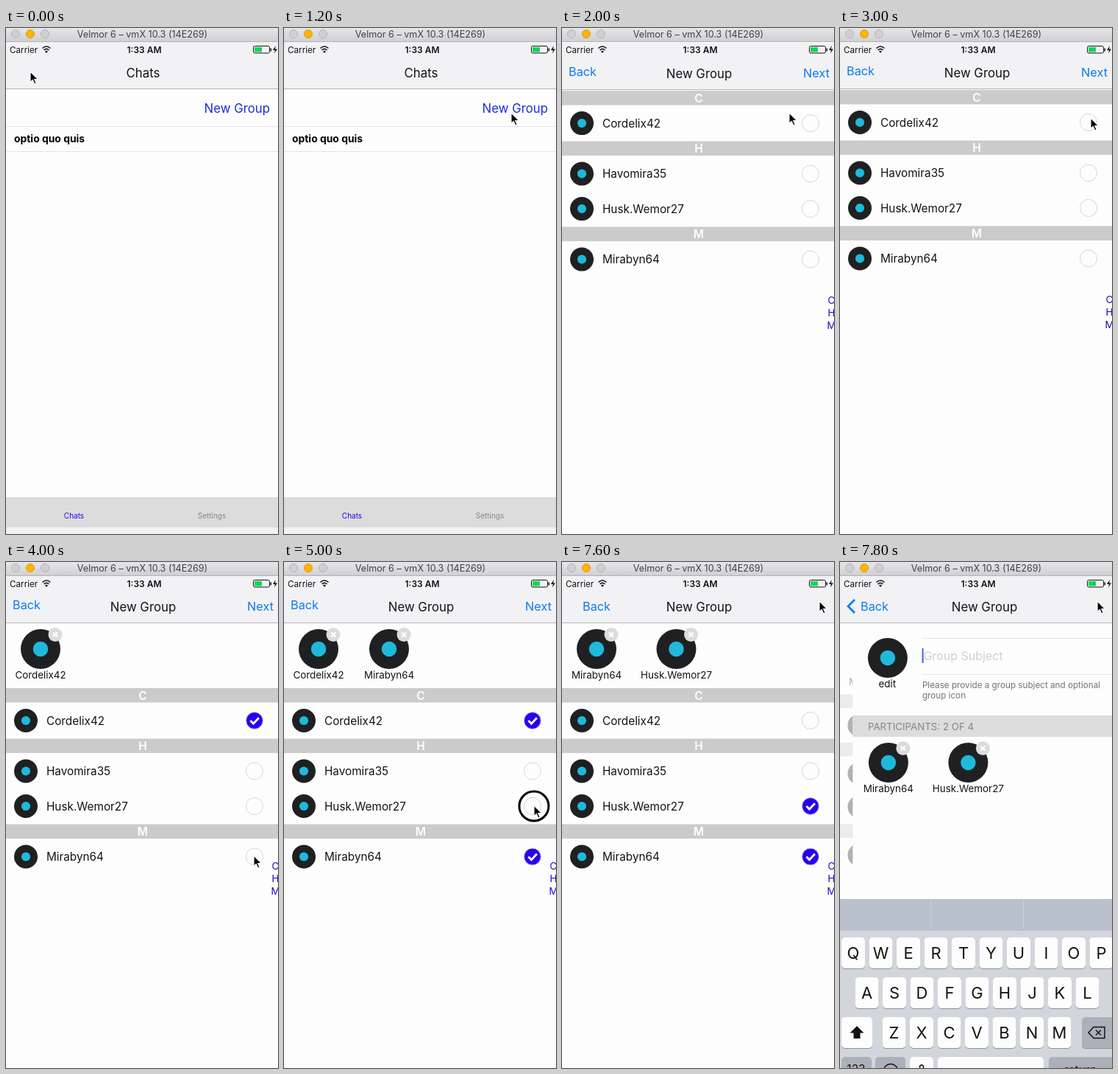
Animation, 370 px wide and 686 px high, one loop 8000 ms. Source, as an HTML page:

```html
<!DOCTYPE html>
<html lang="en">
<head>
<meta charset="utf-8">
<title>New group</title>
<style>
  html, body { margin: 0; width: 100%; height: 100%; overflow: hidden; background: #fdfdfd; }
  svg { display: block; width: 370px; height: 686px; font-family: Inter, "Open Sans", sans-serif; }
</style>
</head>
<body>
<svg id="stage" viewBox="0 0 370 686"></svg>
<script>
const LOOP = 8000, STEP = 200;
const PAPER = '#fdfdfd', NAV = '#f2f2f5', BAND = '#cbcbcc', SOFT = '#dcdcdd', HAIR = '#e4e4e8';
const BLUE = '#0a7cf0', VIOLET = '#2b00ee', INK = '#131315', MUTED = '#86868a', DARK = '#1f2022', CYAN = '#1fb9dc';

const OPEN_AT = 1600, NEXT_AT = 7600;
const CLICKS = [1400, 3400, 4200, 5000, 6000, 7400];
const PATH = [
  [0, 33, 59], [400, 33, 59], [1200, 309, 115], [2000, 309, 115], [2800, 341, 122],
  [3600, 341, 122], [4000, 337, 398], [4400, 337, 398], [5000, 340, 330],
  [5200, 340, 330], [5800, 340, 217], [6400, 340, 217], [7200, 350, 53], [8000, 350, 53]
];
// Listed in the order in which they get picked.
const PEOPLE = [
  { name: 'Cordelix42', y: 128, chip: 72, from: 3600, to: 6200 },
  { name: 'Mirabyn64', y: 312.5, chip: 72, from: 4400, to: LOOP },
  { name: 'Husk.Wemor27', y: 244, chip: 97, from: 5200, to: LOOP },
  { name: 'Havomira35', y: 196.5, chip: 85, from: LOOP, to: LOOP }
];
const SECTIONS = [['C', 84], ['H', 152.5], ['M', 268.5]];

const rest = (t, start, span) => (1 - Math.min(1, Math.max(0, (t - start) / span))) ** 4;
const rect = (x, y, w, h, fill, more = '') => `<rect x="${x}" y="${y}" width="${w}" height="${h}" fill="${fill}" ${more}/>`;
const disc = (x, y, r, fill, more = '') => `<circle cx="${x}" cy="${y}" r="${r}" fill="${fill}" ${more}/>`;
const line = (d, color, width = 1, more = '') => `<path d="${d}" fill="none" stroke="${color}" stroke-width="${width}" ${more}/>`;
const text = (s, x, y, size, fill = INK, anchor = 'start', weight = 400) =>
  `<text x="${x}" y="${y}" font-size="${size}" fill="${fill}" text-anchor="${anchor}" font-weight="${weight}">${s}</text>`;
const group = (body, transform = '', opacity = 1) => `<g transform="${transform}" opacity="${opacity}">${body}</g>`;
const hair = (x, y) => line(`M${x} ${y}H376`, HAIR);
const navBar = body => rect(-2, 19, 376, 63, NAV) + line('M-2 82.5H374', '#b4b4b8') + body;

const avatar = (x, y, r) => disc(x, y, r, DARK) + disc(x, y, r * 0.38, CYAN);

// A covered card shrinks toward its left edge and fades.
const recede = (body, p) => {
  const s = 1 - 0.05 * p;
  return group(body, `translate(-1.5 352.5) scale(${s}) translate(1.5 -352.5)`, 1 - 0.7 * p);
};

function titleBar() {
  return `<linearGradient id="bar" x2="0" y2="1"><stop stop-color="#e6e6e9"/><stop offset="1" stop-color="#cfcfd3"/></linearGradient>`
    + rect(0, 0, 370, 19, 'url(#bar)') + line('M0 18.5H370', '#b2b2b6')
    + [13, 53].map(x => disc(x, 8, 5.5, '#d0d0d3', 'stroke="#b3b3b7"')).join('')
    + disc(33, 8, 5.5, '#ffb400', 'stroke="#dc9a10"')
    + text('Velmor 6 – vmX 10.3 (14E269)', 185.5, 13, 12.6, '#414145', 'middle');
}

function statusBar() {
  return text('Carrier', 5, 33.5, 11.7)
    + line('M49.5 27.5Q55 22.5 60.5 27.5M51.6 30Q55 26.8 58.4 30', INK, 1.6)
    + `<path d="M53 31.7Q55 29.8 57 31.7L55 34Z" fill="${INK}"/>`
    + text('1:33 AM', 188, 33.5, 12, INK, 'middle', 600)
    + rect(336.5, 24.5, 22, 9.5, 'none', `rx="2" stroke="${INK}"`) + rect(338, 26, 10, 6.5, '#12d65c')
    + rect(359.5, 27.5, 1.5, 4, INK)
    + `<path d="M367 24l-4 6h3l-1 4.5 4-6h-3z" fill="${INK}"/>`;
}

function chatsScreen() {
  return rect(-2, 19, 376, 667, PAPER)
    + navBar(text('Chats', 186.5, 66.5, 16.8, INK, 'middle'))
    + text('New Group', 359, 114.5, 16.8, '#1b2fd8', 'end')
    + hair(0, 133.5) + text('optio quo quis', 11, 155, 13.9, '#000', 'start', 700) + hair(0, 167.5)
    + rect(-2, 636, 376, 41, SOFT) + rect(-2, 677, 376, 9, '#f1f1f3')
    + text('Chats', 92.5, 664.5, 10, VIOLET, 'middle') + text('Settings', 280, 664.5, 10, MUTED, 'middle');
}

function chips(picked) {
  let left = 11;
  return picked.map(({ name, chip }) => {
    const x = left + chip / 2;
    left += chip + 24;
    return avatar(x, 118, 27) + disc(x + 20, 98.5, 9.5, SOFT)
      + line(`M${x + 17} 95.5l6 6m0 -6l-6 6`, '#fff', 2.2) + text(name, x, 158, 13.4, INK, 'middle');
  }).join('');
}

function listBody(t, picked) {
  const shift = picked.length ? 87 : 0;
  const bands = SECTIONS.map(([letter, y]) =>
    rect(-2, y, 376, 19.5, BAND) + text(letter, 186, y + 15.5, 15.5, '#fff', 'middle', 600)).join('');
  const rows = PEOPLE.map(p => avatar(27, p.y, 16) + text(p.name, 55, p.y + 5.7, 15.3)
    + (picked.includes(p)
      ? disc(338, p.y, 11.5, VIOLET, 'stroke="#dadade"') + line(`M332.5 ${p.y}l4 4.3 7.5-8`, '#fff', 2.8)
      : disc(338, p.y, 11.5, 'none', 'stroke="#d6d6da"'))).join('');
  const index = SECTIONS.map(([letter], i) =>
    text(letter, 366.5, 373 + 17 * i + shift / 2, 13.4, '#2f00cc', 'middle')).join('');
  return rect(-2, 82, 376, 604, PAPER) + chips(picked) + group(bands + rows, `translate(0 ${shift})`) + index;
}

function subjectPage(picked) {
  return rect(-1.5, 83, 380, 603, PAPER)
    + avatar(46, 130, 27) + text('edit', 45.5, 170, 13.4, INK, 'middle')
    + hair(93, 103.5) + hair(93, 152.5)
    + text('Group Subject', 94.5, 133, 16, '#cfcfd5') + rect(92.7, 117, 2, 20, '#4a63d8')
    + text('Please provide a group subject and optional', 93, 171, 11.7, '#747478')
    + text('group icon', 93, 185, 11.7, '#747478')
    + rect(-1.5, 208, 380, 29, SOFT) + text('PARTICIPANTS: 2 OF 4', 19, 227.5, 13.3, MUTED)
    + group(chips(picked), 'translate(0 154)');
}

function keyboard() {
  const key = (x, y, w, fill = '#fdfdfd') =>
    rect(x, y + 1, w, 42, '#8f9298', 'rx="5"') + rect(x, y, w, 42, fill, 'rx="5"');
  const letters = [['QWERTYUIOP', 18, 509], ['ASDFGHJKL', 36.5, 563], ['ZXCVBNM', 73.5, 617]]
    .map(([row, x0, y]) => [...row].map((c, i) => {
      const x = x0 + 37.5 * i;
      return key(x - 16, y, 32) + text(c, x, y + 29, 22, INK, 'middle');
    }).join('')).join('');
  const gray = '#abb0ba';
  return rect(0, 457, 370, 260, '#d2d5db') + rect(0, 457, 370, 43, '#b9c1cc')
    + line('M123.5 459V498M249.5 459V498', '#cdd2da') + letters
    + key(2, 617, 42) + `<path d="M23 629l9.5 9.5h-5v7.5h-9v-7.5h-5z" fill="${INK}"/>`
    + key(329, 617, 46, gray) + line('M338 638l7-7.5h15v15h-15zM348 634.5l7 7m0-7l-7 7', INK, 1.5)
    + key(2, 671, 41, gray) + key(48, 671, 41, gray) + key(95, 671, 32)
    + key(133, 671, 144) + key(284, 671, 92, gray)
    + text('123', 22, 693, 15.5, INK, 'middle') + text('return', 327, 694, 15.5, INK, 'middle')
    + disc(69, 690, 9.5, 'none', `stroke="${INK}" stroke-width="1.5"`)
    + disc(66, 687, 1.3, INK) + disc(72, 687, 1.3, INK)
    + rect(108.5, 682, 5, 14, 'none', `rx="2.5" stroke="${INK}" stroke-width="1.5"`);
}

function groupHeader(t) {
  const title = x => text('New Group', x, 66.5, 16.8, INK, 'middle');
  if (t < NEXT_AT)
    return navBar(title(186.5) + text('Back', 9, 63.5, 16.3, BLUE) + text('Next', 364, 65.5, 16.3, BLUE, 'end'));
  const back = text('Back', 28, 66, 16.3, BLUE);
  return navBar(t > NEXT_AT
    ? title(196.5) + line('M20 51l-9 9 9 9', BLUE, 2.8) + back
    : title(186.5) + back);
}

function modal(t) {
  const picked = PEOPLE.filter(p => t >= p.from && t < p.to);
  const slide = rest(t, NEXT_AT, 380);
  const list = recede(listBody(t, picked), 1 - slide);
  const page = t > NEXT_AT
    ? group(subjectPage(picked), `translate(${375 * slide} 0)`)
      + group(keyboard(), `translate(0 ${258 * rest(t, NEXT_AT, 480) - 29.9})`)
    : '';
  return group(rect(-2, 19, 376, 670, PAPER) + list + page + groupHeader(t),
    `translate(0 ${667 * rest(t, OPEN_AT, 500)})`);
}

function pointer(t) {
  const i = PATH.findIndex(k => k[0] > t);
  const [t0, x0, y0] = PATH[i - 1], [t1, x1, y1] = PATH[i];
  const u = (t - t0) / (t1 - t0), e = u * u * (3 - 2 * u);
  const ring = CLICKS.includes(t) ? disc(0, 1, 20, 'none', 'stroke="#000" stroke-width="3"') : '';
  return group(ring + '<path d="M0 0v14.5l3.3-3 2.5 5.5 2.4-1-2.4-5.4h4.7z" stroke="#fff" stroke-width="1.2"/>',
    `translate(${x0 + (x1 - x0) * e} ${y0 + (y1 - y0) * e})`);
}

const stage = document.getElementById('stage');
const begin = performance.now();
let shown = -1;

function tick() {
  const t = Math.floor((performance.now() - begin) % LOOP / STEP) * STEP;
  if (t !== shown) {
    shown = t;
    const opened = 1 - rest(t, OPEN_AT, 500);
    stage.innerHTML = rect(0, 0, 370, 686, PAPER) + recede(chatsScreen(), opened)
      + modal(t) + statusBar() + titleBar() + pointer(t);
  }
  requestAnimationFrame(tick);
}
tick();
</script>
</body>
</html>
```
